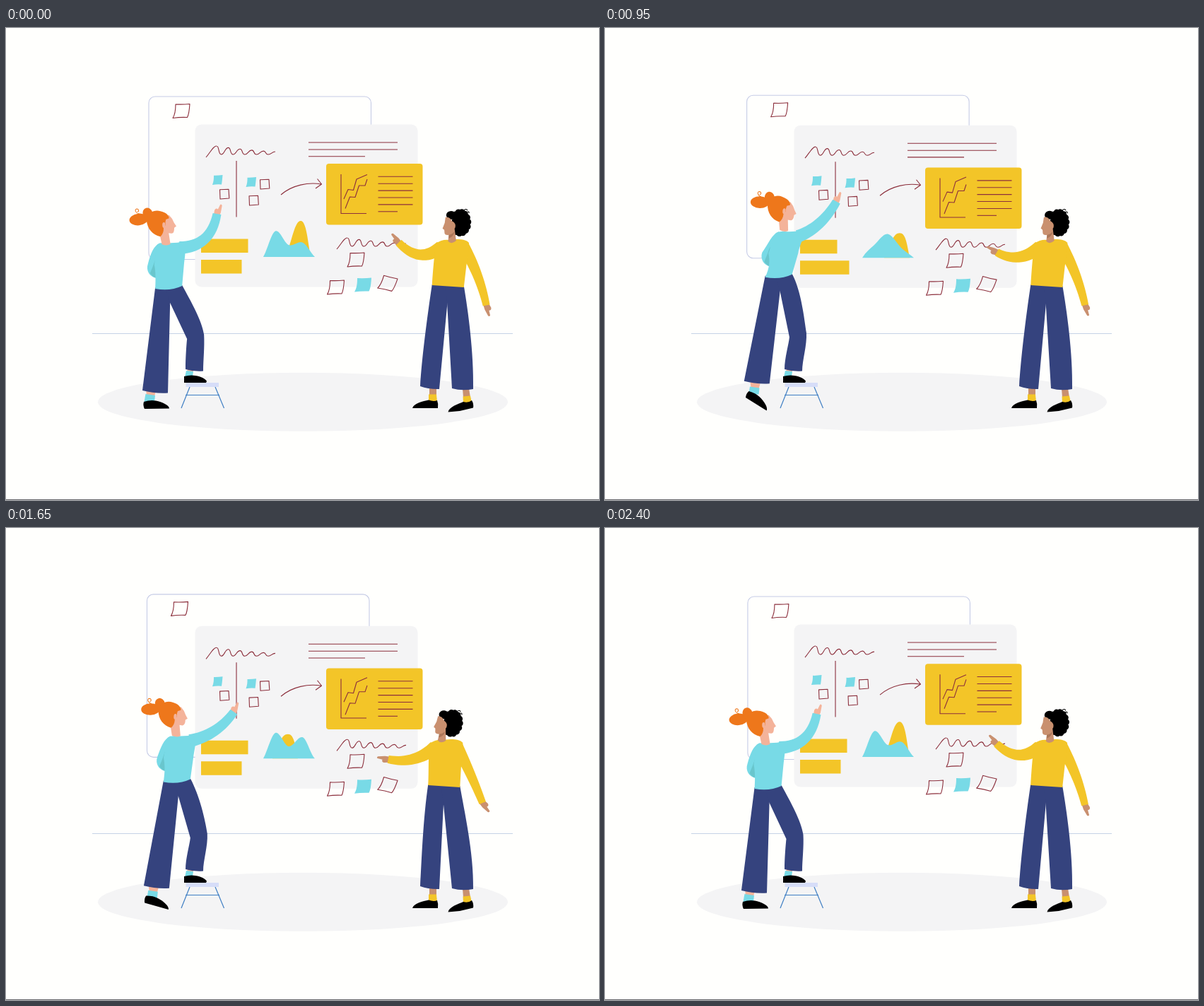
An HTML page with a canvas that plays this animation: 839 by 668 pixels, repeating every 2.45 s.

```html
<!DOCTYPE html>
<html lang="en">
<head>
<meta charset="utf-8">
<title>Whiteboard session</title>
<style>
html, body { margin: 0; width: 100%; height: 100%; overflow: hidden; background: #fffffd; }
canvas { display: block; }
</style>
</head>
<body>
<canvas id="stage" width="839" height="668"></canvas>
<script>
const ctx = document.getElementById('stage').getContext('2d');
const LOOP = 2450, STEP = 50;
const C = {
  paper: '#fffffd', board: '#f4f4f5', cyan: '#78dae6', teal: '#69c6cd', yellow: '#f3c528',
  navy: '#35437e', ink: '#8c2f3c', frame: '#c5cbe6', hair: '#ee771b', black: '#000',
  pale: '#f4b39a', brown: '#c9906f', seat: '#d6ddf8', stool: '#3f7fc4'
};

const ease = u => (1 - Math.cos(Math.PI * u)) / 2;
const linear = u => u;
const RAD = Math.PI / 180;
// Cyclic 0-1-0 movement: rises from `low` to `high`, falls until `end` (at most low + 1).
function pulse(p, low, high, end, fall = ease) {
  const x = p < low ? p + 1 : p;
  if (x < high) return ease((x - low) / (high - low));
  return x < end ? fall((end - x) / (end - high)) : 0;
}

const mix = (a, b, k = .5) => [a[0] + (b[0] - a[0]) * k, a[1] + (b[1] - a[1]) * k];
const polar = ([x, y], r, deg) => [x + r * Math.cos(deg * RAD), y + r * Math.sin(deg * RAD)];
const at = ([dx, dy], path) =>
  path.replace(/(-?[\d.]+) (-?[\d.]+)/g, (m, x, y) => `${+x + dx} ${+y + dy}`);
function fill(color, ...parts) {
  ctx.fillStyle = color;
  ctx.fill(new Path2D(parts.join(' ')));
}
function line(path, color = C.ink, width = 1.1) {
  ctx.strokeStyle = color;
  ctx.lineWidth = width;
  ctx.stroke(new Path2D(path));
}
function rect(color, x, y, w, h, r = 0) {
  ctx.fillStyle = color;
  ctx.beginPath();
  ctx.roundRect(x, y, w, h, r);
  ctx.fill();
}
function oval(color, x, y, rx, ry = rx, turn = 0) {
  ctx.fillStyle = color;
  ctx.beginPath();
  ctx.ellipse(x, y, rx, ry, turn, 0, 7);
  ctx.fill();
}
function group(dx, dy, draw, deg = 0, px = 0, py = 0) {
  ctx.save();
  ctx.translate(dx + px, dy + py);
  ctx.rotate(deg * RAD);
  ctx.translate(-px, -py);
  draw();
  ctx.restore();
}
// Tapered limb along a quadratic curve.
function limb(color, a, b, c, w0, w1) {
  const left = [], right = [];
  for (let i = 0; i <= 16; i++) {
    const u = i / 16, p = mix(a, b, u), q = mix(b, c, u), [x, y] = mix(p, q, u);
    const dx = q[0] - p[0], dy = q[1] - p[1];
    const k = (w0 + (w1 - w0) * u) / 2 / Math.hypot(dx, dy);
    left.push(`${x - dy * k} ${y + dx * k}`);
    right.unshift(`${x + dy * k} ${y - dx * k}`);
  }
  fill(color, 'M' + left.concat(right).join('L') + 'Z');
}
const hand = (color, [x, y], deg) => group(x, y, () =>
  fill(color, 'M-2 4 L5 4 L15 2 Q17 0 15 -1 L8 -1.5 Q9 -5 5 -5.5 L-2 -4Z'), deg);

const NOTE = 'M4 1 Q14 1.5 24 .5 C23.5 8 23 15 20.5 19.5 Q10 19 0 20.5 C3.5 15 4 8 4 1Z';
const CHIP = 'M2 .8 Q8 1 14.5 0 C14 6 13.5 10 13 13.5 Q6 13 0 14 C2 9 2 5 2 .8Z';
const BOX = 'M.5 .8 L13 .2 L13.8 13 L1 14Z';

function scribble(x, y) {
  let path = `M${x} ${y} c6 -7 11 -17 15 -16`;
  for (let i = 0, h = 12; i < 5; i++, h *= .8)
    path += `c4 0 2 ${h} 6.6 ${h} s5 ${-.8 * h} 10 ${-.8 * h}`;
  line(path);
}

function backFrame(k) {
  group(-3.2 * k, -4 * k, () => {
    ctx.strokeStyle = C.frame;
    ctx.lineWidth = 1.1;
    ctx.beginPath();
    ctx.roundRect(202, 97, 314.5, 230.5, 9);
    ctx.stroke();
    line(at([236, 107], NOTE));
  });
}

function hills(p) {
  const base = 324, slide = 417 - 19 * pulse(p, .4, .62, 1);
  const h = 51 - 18 * Math.sqrt(pulse(p, 0, .55, 1));
  fill(C.yellow, at([slide, base], `M-22 0 C-12 -22 -9 ${-h} 0 ${-h} C8 ${-h} 10 -22 14 0Z`));

  const swap = pulse(p, 0, .36, .7);
  const pts = [[364, 0], [381, 36.5 - 18.5 * swap], [400, 17 + 17 * swap],
    [420, 11 + 19 * pulse(p, .3, .69, 1.3)], [437, 0]];
  const slope = j => j === 0 ? 1.6 : j === 4 ? -.9
    : (pts[j + 1][1] - pts[j - 1][1]) / (pts[j + 1][0] - pts[j - 1][0]);
  let path = `M364 ${base}`;
  for (let i = 0; i < 4; i++) {
    const [x0, y0] = pts[i], [x1, y1] = pts[i + 1], d = (x1 - x0) / 3;
    path += `C${x0 + d} ${base - y0 - slope(i) * d} ${x1 - d} ${base - y1 + slope(i + 1) * d} ${x1} ${base - y1}`;
  }
  fill(C.cyan, path + 'Z');
}

function board(p, k) {
  const trade = pulse(p, .16, .388, .57);
  group(0, 2.9 * k, () => {
    rect(C.board, 267.5, 136.5, 315, 230, 9);
    scribble(283, 183);
    scribble(468, 313);
    line('M326 188 L326 267.5 M428 162 L554 162 M428 172 L554 172 M428 181.7 L508 181.7');
    fill(C.cyan, at([292, 208], CHIP));
    fill(C.cyan, at([339.5, 211], CHIP));
    for (const pos of [[302, 228], [359, 214], [343.5, 237]]) line(at(pos, BOX));
    line('M389 236 C405 222 428 218 446 221 M440.5 213.5 L446.5 221 L438 227');
    rect(C.yellow, 276, 298.5, 66.5 - 14 * trade, 19.5);
    rect(C.yellow, 276, 328, 57.5 + 12 * trade, 19.5);
    hills(p);
  });
}

function card(k) {
  const gap = 3.5 * k;
  group(0, 10 * k, () => {
    rect(C.yellow, 453, 192, 136.5, 86.5, 4);
    line('M474 207 L474 262.5 L510 262.5');
    line(at([0, -gap], 'M478 242 L484 228.5 L491.5 229.5 L496 214 L511 207.5'));
    line(at([0, gap], 'M480 255.5 L486.5 239 L494 239.5 L499.5 223 L508 223 L511 214'));
    for (let i = 0; i < 6; i++) line(`M526.5 ${210.3 + i * 9.9} L${i < 5 ? 575.5 : 554} ${210.3 + i * 9.9}`);
  });
}

function looseNotes(k) {
  group(0, 2.9 * k, () => {
    line(at([483, 317.5], NOTE));
    line(at([454.5, 356.5], NOTE));
    fill(C.cyan, at([493, 353], NOTE));
    group(528, 351, () => line(NOTE), 15, 12, 10);
  });
}

function stool() {
  line('M260 508 L248 538 M296 508 L308.5 538 M254 519.5 L302 519.5', C.stool, 1.2);
  rect(C.seat, 254.5, 502, 46.5, 6);
}

function drawWoman(p) {
  const lean = pulse(p, .12, .39, 1.12, linear), rise = pulse(p, .05, .44, .95);
  const head = [33 * lean - 4, -20 * pulse(p, .03, .42, 1)];
  const top = [head[0], head[1] * .82];
  const hip = [17.5 * pulse(p, .11, .44, 1.1) - .8, -17 * rise];
  const reach = [36 * pulse(p, .14, .45, 1.14) - 6, -18 * pulse(p, .15, .42, .76) - 1];
  const lift = rise ** 1.3;
  const mid = mix(top, hip), hem = [4 * lift, -14 * lift];
  const knee = [5 * Math.tanh(hip[0] / 6), hip[1] * .15];

  group(8 * lift, -11 * lift, () => {
    fill(C.pale, 'M198 512 L212 514 L210 521 L199 520Z');
    fill(C.cyan, 'M197.5 518 L211 520 L210 529 L195.5 529Z');
  });
  group(-2.5 * lift, 2 * lift, () => fill(C.black,
    'M195 529 Q204 526 212 527.5 C221 529 231 534 231 538.5 L196 539 Q193.5 534 195 529Z'), 35 * lift, 229, 539);
  fill(C.pale, 'M257 482 L266 483 L264 488 L256 487Z');
  fill(C.cyan, 'M255 485 L265 486 L264 494 L253 494Z');
  fill(C.black, 'M252 493 Q261 490.5 268 492 C276 493 283 497 284 500 L283 502 L252 502Z');

  fill(C.cyan, at(top, 'M217 304 C207 308 203 320'), at(mid, '200 334 C197 343 202 352 212 354 L218 330Z'));
  fill(C.teal, at(mid, 'M211 326 C208 335 206 340 203 347 Q207 353 212 353.5Z'));
  fill(C.navy, at(hip, 'M211 367 L236 368 L232 389'), at(hem, 'L229 516.5 Q210 517.5 193 513Z'));
  fill(C.navy, at(hip, 'M226 370 L249 364 C262 388'), at(knee, '277 414 280 434 C281 452'),
    '279 470 279 485.5 Q266 486.5 254 483 C254 468', at(knee, '255 450 256 440'), at(hip, 'L232 389Z'));

  fill(C.cyan, at(top, 'M212 307 Q218 303 225 304 Q238 305 251 302 C254 312'),
    at(mid, '252 325 251 335'), at(hip, 'L249 365 Q232 373 211 369'),
    at(mid, 'C211 355 211 345 209 335'), 'Z');
  const wrist = [301 + reach[0], 264 + reach[1]];
  const elbow = [289 + .6 * top[0], 310 + 1.7 * top[1]];
  hand(C.pale, mix(wrist, elbow, .03), -68);
  limb(C.cyan, [244 + top[0], 311 + top[1]], elbow, wrist, 18, 12);

  group(head[0], head[1], () => {
    fill(C.pale, 'M222 268 L230 265 Q235 270 237 276 L240 281 L237 283 Q237 291 233 291 L229 290.5 L231 306 Q226 309 219 306 L216 291Z');
    oval(C.hair, 187, 270, 13.2, 8.3, -.08);
    oval(C.hair, 200, 262, 7, 8.3, -.25);
    fill(C.hair, 'M198 271 C200 260 210 256.5 218 259 C226 261 230 265 230 269.5 L225.5 271 Q224 275 225 279 L222 283 Q222 291 217 295 C206 292 199 284 198 271Z');
    oval(C.pale, 222.5, 279, 2.2, 4);
    line('M188 262 C183 261 181 256 184.5 255 C188 255 188 259 185.5 259', C.hair, 1);
  }, 9 * lean - 3, 224, 298);
}

function drawMan(p) {
  const sway = pulse(p, .15, .74, 1.15);
  const dx = 4 - 18 * sway, hip = [1.2 - 8.2 * sway, 0], top = [.72 * dx, 0], mid = mix(top, hip);
  const drop = 43 * pulse(p, .16, .57, 1.16, linear);
  const wrist = [562 - 22 * sway, 292 + drop], cuff = [682 - 8 * sway, 394 - 5 * sway];

  fill(C.brown, 'M599 508 L609 508 L609 520 L599 520Z M646 510 L655 510 L657 523 L647 523Z');
  fill(C.yellow, 'M598 518.5 L609 518.5 L610 529 L598 529Z M646.5 521.5 L657 520.5 L659 530 L647 531Z');
  fill(C.black, 'M575 538 C577 531 590 528 598 526.5 Q605 529 610 527 Q612 532 611 538Z');
  fill(C.black, 'M625.5 543.5 C627 536 640 532 647 529 Q654 531 659 527 Q662 532 661 537.5 L642 542Z');

  fill(C.navy, at(hip, 'M604 363 L629 364 L626 386'), 'L613 511 Q598 511.5 586 507 C588 470',
    at(hip, '597 410 604 363Z'));
  fill(C.navy, at(hip, 'M622 364 L649 365 C655 400'), '662 460 661 511 Q645 514 631 510', at(hip, 'L625 384Z'));

  hand(C.brown, cuff, 82 - 31 * sway);
  limb(C.yellow, [647 + top[0], 307], [671.5 + dx, 348], cuff, 17, 10);
  hand(C.brown, wrist, 251 - 1.75 * drop);
  limb(C.yellow, [617 + top[0], 310], [586 + .5 * dx, 335], wrist, 19, 11);
  fill(C.yellow, at(top, 'M609 305 Q618 299 627 300 L639 299 C646 299 653 300 656 304 C656 320'),
    at(mid, '653 330 652 340'), at(hip, 'L649 367 L604 364 C605 345'), at(top, '607 322 609 305Z'));

  group(dx, 0, () => {
    oval(C.black, 644, 275, 12, 16);
    oval(C.black, 631, 265, 7, 6);
    for (let a = -130; a <= 120; a += 25) {
      const [x, y] = polar([0, 0], 1, a);
      oval(C.black, 644 + 11 * x, 275.5 + 15 * y, 4.6);
    }
    line('M648 259 Q652 254 654 258 M652 261 Q657 258 656 262', C.black, 1);
    fill(C.brown, 'M623 268 Q629 267 632 273 L635 275 Q639 279 636 284 L638.5 301 Q632 307 627 302 L628 293 Q623 294 622 291 L621.5 286 L619 284 L622 276Z');
    fill('#ab7658', 'M628 293 Q633 292 636 288 Q635 295 628 298Z');
  }, -.55 * dx, 638, 280);
}

function draw(p) {
  const half = p * 2 % 1, k = pulse(half, 0, .5, 1);
  ctx.lineJoin = 'round';
  rect(C.paper, 0, 0, 839, 668);
  rect('#66666a', 0, 667, 839, 1);
  oval(C.board, 420, 529.3, 290, 41.5);
  line('M122 432.5 L717 432.5', '#c5d3e6');
  backFrame(k);
  board(p, k);
  card(pulse(half, 0, .58, 1));
  looseNotes(k);
  stool();
  drawWoman(p);
  drawMan(p);
}

const start = performance.now();
function tick() {
  const t = (performance.now() - start) % LOOP;
  draw(Math.floor(t / STEP) * STEP / LOOP);
  requestAnimationFrame(tick);
}
tick();
</script>
</body>
</html>
```
